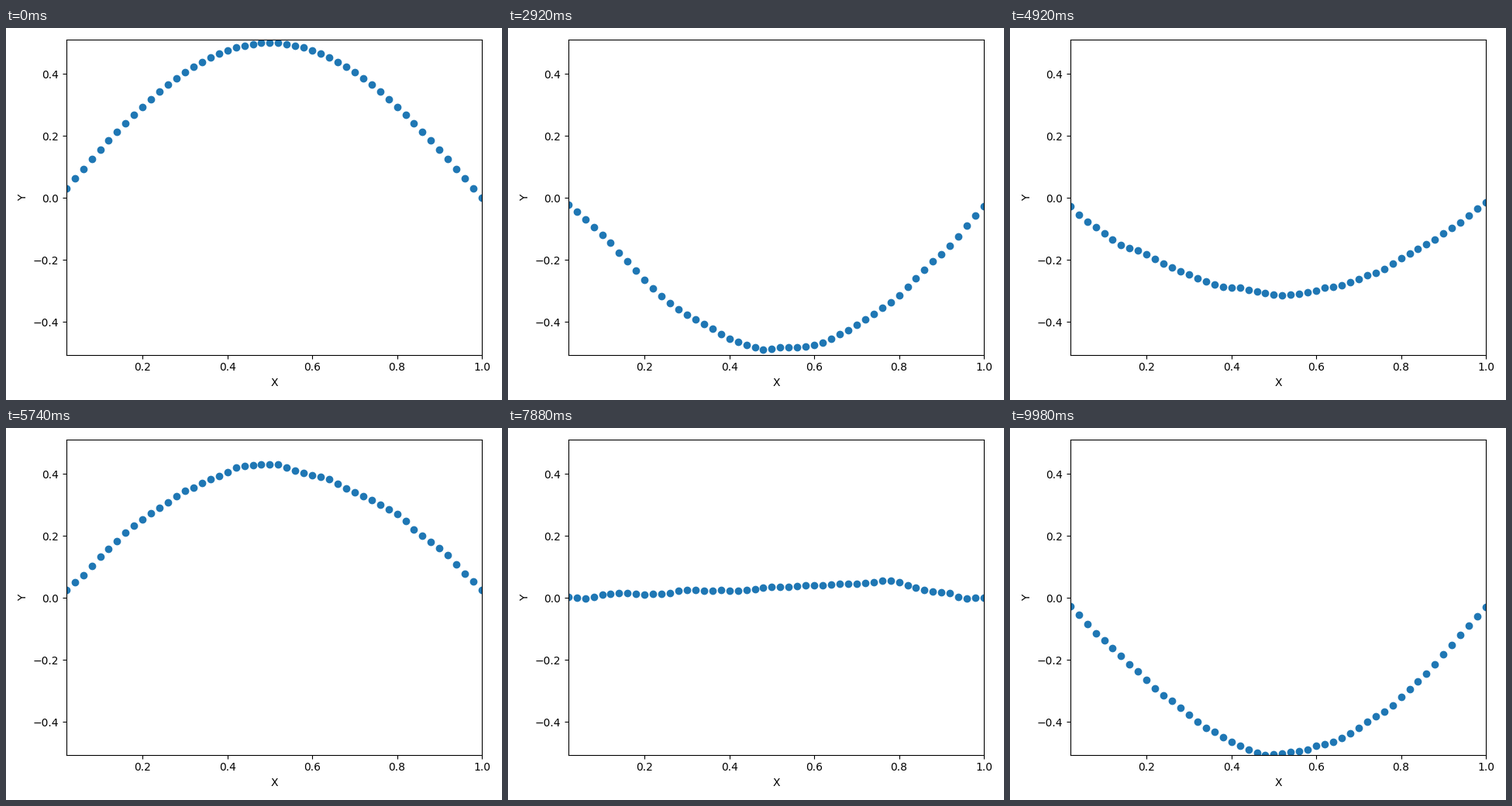
A matplotlib script that plays this animation: 640 by 480 pixels, repeating every 10000 ms.

```python
import numpy as np
import matplotlib.pyplot as plt
from matplotlib.animation import FuncAnimation

BEADS = 50
FRAMES = 500
STIFFNESS = 10.0   # spring constant over bead mass
DURATION = 500.0   # simulated time of one loop

# Beads on a string tied at 0 and BEADS + 1, released from rest.
index = np.arange(1, BEADS + 1)
x = index / BEADS
start = 0.5 * np.sin(np.pi * x)

# Exact motion as a sum of the normal modes of the chain.
modes = np.sin(np.pi * np.outer(index, index) / (BEADS + 1))
weights = 2 / (BEADS + 1) * modes @ start
omega = 2 * np.sqrt(STIFFNESS) * np.sin(np.pi * index / (2 * (BEADS + 1)))
times = np.linspace(0, DURATION, FRAMES)
heights = (np.cos(np.outer(times, omega)) * weights) @ modes

fig, ax = plt.subplots(figsize=(6.4, 4.8), dpi=100)
dots, = ax.plot(x, heights[0], "o", color="#1f77b4")
ax.set_xlim(x[0], x[-1])
ax.set_ylim(heights.min(), heights.max())
ax.set_xlabel("X")
ax.set_ylabel("Y")
fig.tight_layout()


def update(frame):
    dots.set_ydata(heights[frame])
    return dots,


anim = FuncAnimation(fig, update, frames=FRAMES, interval=20,
                     repeat=True, repeat_delay=0, blit=False)
plt.show()
```
